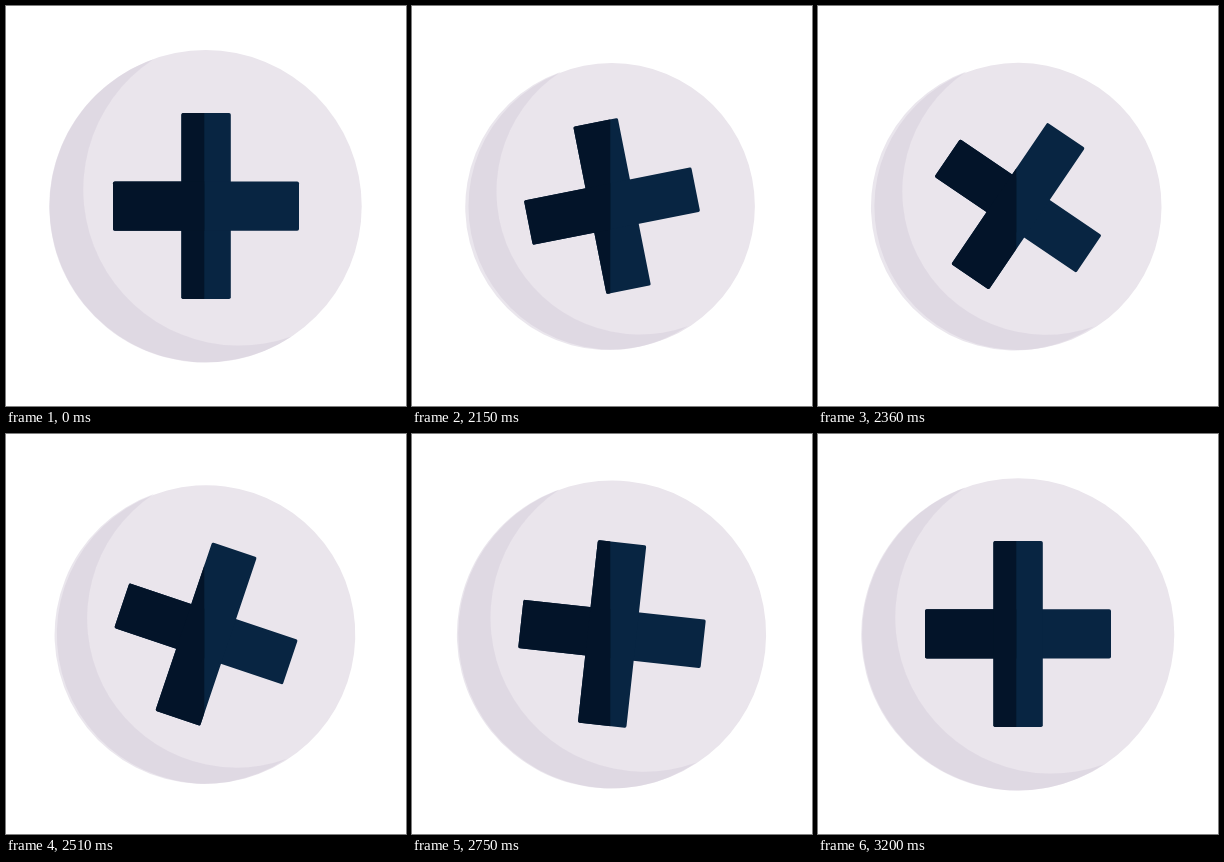
Write an HTML page that moves like this. It is 400 by 400 pixels and loops after 3.23 s.

```html
<!DOCTYPE html>
<html lang="en">
<head>
<meta charset="utf-8">
<title>Plus button</title>
<style>
  html, body { margin: 0; width: 100%; height: 100%; overflow: hidden; background: #fff; }
  svg { display: block; width: 100vw; height: 100vh; }
</style>
</head>
<body>
<svg viewBox="0 0 400 400">
  <defs>
    <clipPath id="left"><rect width="198.3" height="400"/></clipPath>
    <g id="cross">
      <rect x="175.4" y="107" width="49.4" height="186" rx="1.8"/>
      <rect x="107" y="175.4" width="186" height="49.4" rx="1.8"/>
    </g>
  </defs>
  <circle class="spin" cx="199.6" cy="200.2" r="156.1" fill="#eae5ec"/>
  <path id="shade" fill="#d6cddc" fill-opacity=".5"
    d="M147.1 53.4A156.1 156.1 0 1 0 285.6 330.6A156.1 156.1 0 0 1 147.1 53.4Z"/>
  <use class="spin" href="#cross" fill="#082542"/>
  <g clip-path="url(#left)"><use class="spin" href="#cross" fill="#031429"/></g>
</svg>
<script>
const LOOP = 3230, START = 2000, DIP = 200, LENGTH = 1200, STEP = 30;
const spinning = document.querySelectorAll('.spin');
const shade = document.getElementById('shade');

// Cubic Bezier easing with handles (x1, 0) and (x2, 1)
const ease = (x1, x2) => x => {
  if (x <= 0) return 0;
  if (x >= 1) return 1;
  let lo = 0, hi = 1, s;
  for (let i = 0; i < 24; i++) {
    s = (lo + hi) / 2;
    const r = 1 - s;
    if (3 * s * r * r * x1 + 3 * s * s * r * x2 + s * s * s < x) lo = s; else hi = s;
  }
  return s * s * (3 - 2 * s);
};
const turn = ease(.27, .05), shrink = ease(.33, .67), grow = ease(.26, .17);

const scaleAbout = (x, y, k) => `translate(${x} ${y}) scale(${k}) translate(${-x} ${-y})`;

function draw() {
  const time = performance.now() % LOOP - START;
  const t = Math.max(0, Math.floor(time / STEP) * STEP);
  const angle = -90 * turn(t / LENGTH);
  const scale = 1 - .098 * (shrink(t / DIP) - grow((t - DIP) / (LENGTH - DIP)));
  for (const el of spinning)
    el.setAttribute('transform', `rotate(${angle} 200 200) ${scaleAbout(200, 200, scale)}`);
  shade.setAttribute('transform', scaleAbout(164.6, 204.7, scale));
  requestAnimationFrame(draw);
}
draw();
</script>
</body>
</html>
```
